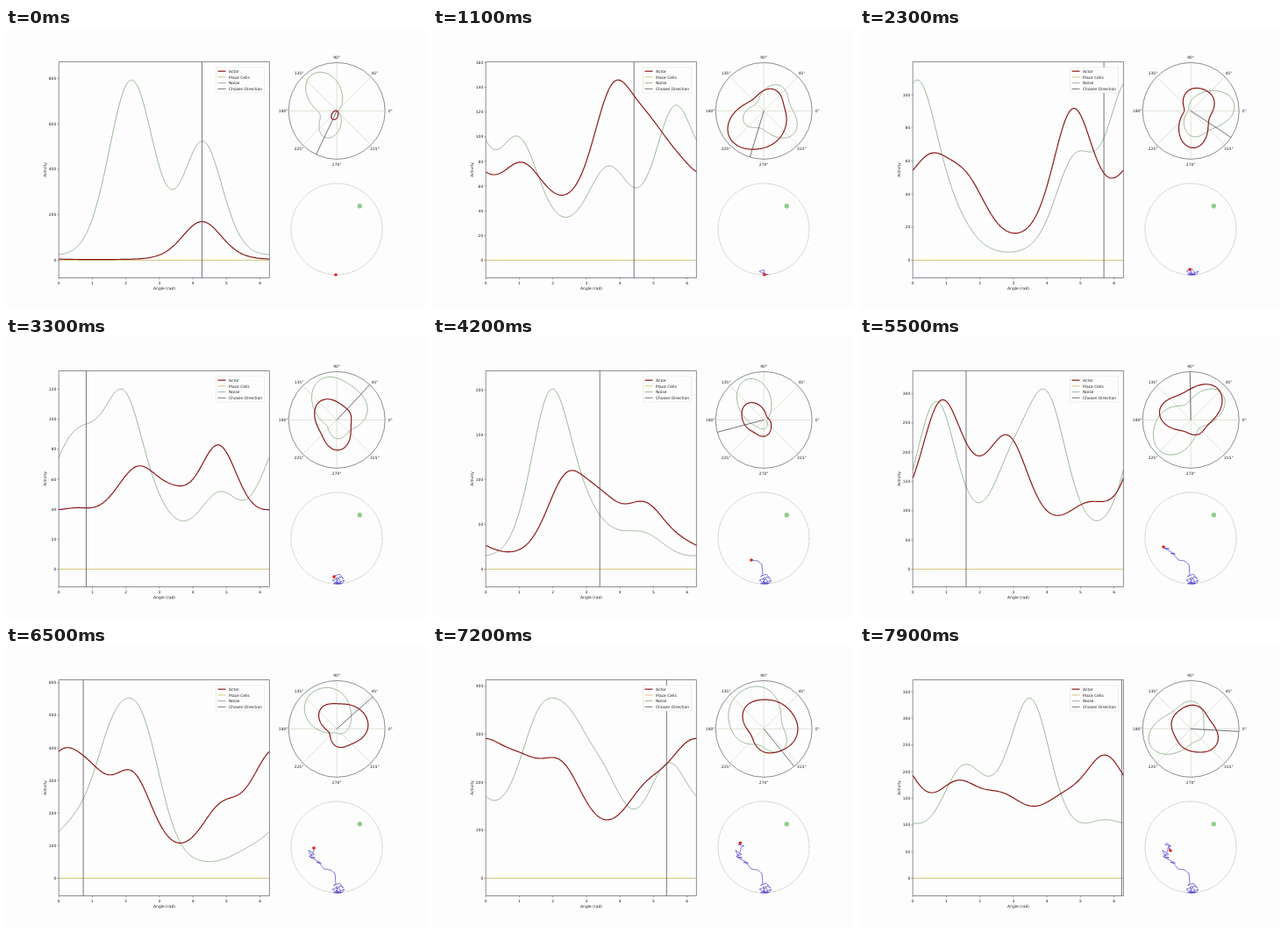
Recreate the animation shown at these times as an HTML page with a canvas. Size 480 by 320 pixels, loop 8000 ms.

```html
<!DOCTYPE html>
<html lang="en">
<head>
<meta charset="utf-8">
<title>Actor activity and path</title>
<style>
html, body { margin: 0; width: 100%; height: 100%; overflow: hidden; background: #fdfdfd; }
canvas { display: block; width: 480px; height: 320px; }
</style>
</head>
<body>
<canvas id="stage" width="480" height="320"></canvas>
<script>
const canvas = document.getElementById('stage');
const ctx = canvas.getContext('2d');
const ratio = Math.max(1, window.devicePixelRatio || 1);
canvas.width = 480 * ratio;
canvas.height = 320 * ratio;

const TAU = Math.PI * 2;
const STEP = 100, STEPS = 80, N = 240;
const BOX = { x: 60.2, y: 38.5, w: 240.2, h: 246 };
const ZERO = 264.4, PEAK = 205.2;
const POLAR = { x: 377.2, y: 94.4, r: 55 };
const ARENA = { x: 377, y: 229, r: 52 };
const PAPER = '#fdfdfd', INK = '#5c5c6c', ACTOR = '#8c1a18', CELLS = '#d2c06c',
      NOISE = '#82a67e', CHOSEN = '#525260', GRID = '#d6d6c8', TRAIL = '#5548cc';

// Activity over all directions: a base plus tuning bumps [direction, height].
function activity(base, ...bumps) {
  return Array.from({ length: N }, (_, i) => bumps.reduce(
    (sum, [dir, h]) => sum + h * Math.exp(3 * (Math.cos(i / N * TAU - dir) - 1)), base));
}

// A pose at one step; both curves are scaled so that the taller one peaks at max.
function pose(step, max, dir, actor, noise) {
  const k = max / Math.max(...actor, ...noise);
  return { step, dir, actor: actor.map(v => v * k), noise: noise.map(v => v * k) };
}

const poses = [
  pose(0, 793, 4.27,
    activity(0.7, [4.27, 43]),
    activity(2, [1.9, 111], [2.42, 111], [4.3, 130])),
  pose(11, 146, 4.42,
    activity(60, [1.08, 51], [3.8, 130], [4.85, 70], [5.8, 37]),
    activity(32, [0.98, 105], [3.66, 75], [5.65, 142])),
  pose(23, 109, 5.7,
    activity(22, [0.55, 78], [1.6, 63], [4.78, 152], [6.05, 23]),
    activity(6, [0.15, 188], [1.2, 32], [4.82, 104], [5.6, 15])),
  pose(42, 201, 3.4,
    activity(14, [2.4, 85], [3.45, 52], [4.75, 55], [5.9, 12]),
    activity(11, [1.94, 185], [2.9, 36], [3.8, 14], [4.75, 26])),
  pose(55, 308, 1.59,
    activity(45, [0.84, 135], [1.8, 26], [2.85, 97], [5.25, 27]),
    activity(35, [0.7, 152], [2.95, 72], [4, 148])),
  pose(65, 553, 0.73,
    activity(25, [0.05, 82], [0.95, 65], [2.2, 84], [4.85, 50], [5.85, 14]),
    activity(14, [0.45, 32], [1.6, 118], [2.5, 130], [5.7, 13])),
  pose(79, 338, 6.23,
    activity(68, [1.35, 42], [2.65, 27], [4.5, 23], [5.75, 72]),
    activity(45, [1.5, 80], [2.55, 22], [3.52, 158], [5.75, 21]))
];

// Waypoints: step, x, y, and how far the agent strays before the next one.
const way = [
  [0, 376, 281, 6, 6], [11, 378, 281, 9, 5], [23, 376, 275, 9, 6], [34, 376, 271, 0, 0],
  [36, 375, 259, 0, 0], [39, 370, 255, 0, 0], [42, 363, 254, 0, 0], [45, 357, 247, 7, 4],
  [55, 346, 239, 5, 8], [65, 351, 230, 7, 9], [79, 354, 233, 0, 0]
];

const rand = n => {
  const v = Math.sin(n * 127.1 + 11.7) * 43758.5453;
  return (v - Math.floor(v)) * 2 - 1;
};
const lerp = (a, b, u) => a + (b - a) * u;

// Value noise with a corner every second step.
function wander(step, seed) {
  const i = Math.floor(step / 2);
  return lerp(rand(i + seed), rand(i + 1 + seed), step / 2 - i);
}

function agent(step) {
  const i = Math.min(way.findLastIndex(w => w[0] <= step), way.length - 2);
  const [s, x, y, sx, sy] = way[i], next = way[i + 1];
  const u = (step - s) / (next[0] - s);
  const stray = u >= 1 ? 0 : Math.sqrt(Math.sin(Math.PI * u));
  const dx = lerp(x, next[1], u) + sx * stray * wander(step, 0) - ARENA.x;
  const dy = lerp(y, next[2], u) + sy * stray * wander(step, 300) - ARENA.y;
  const fit = Math.min(1, ARENA.r / Math.hypot(dx, dy));
  return [ARENA.x + dx * fit, ARENA.y + dy * fit];
}
const trail = Array.from({ length: STEPS }, (_, i) => agent(i));

function state(step) {
  const i = poses.findLastIndex(p => p.step <= step), a = poses[i];
  if (a.step === step) return a;
  const b = poses[i + 1], u = (step - a.step) / (b.step - a.step);
  const [p, q] = [trail[step], trail[step + 1]];
  const dir = (Math.atan2(p[1] - q[1], q[0] - p[0]) + TAU) % TAU;
  const actor = a.actor.map((v, j) => lerp(v, b.actor[j], u));
  const pull = activity(0, [dir, 0.5 * Math.sin(Math.PI * u) * Math.max(...actor)]);
  const noise = a.noise.map((v, j) => lerp(v, b.noise[j], u) + pull[j]);
  return { actor, noise, dir };
}

function stroke(points, color, width) {
  ctx.beginPath();
  points.forEach(([x, y]) => ctx.lineTo(x, y));
  ctx.strokeStyle = color;
  ctx.lineWidth = width;
  ctx.stroke();
}

function frame(x, y, w, h, color, width) {
  ctx.strokeStyle = color;
  ctx.lineWidth = width;
  ctx.strokeRect(x, y, w, h);
}

function ring({ x, y, r }, color, width, dash = []) {
  ctx.beginPath();
  ctx.arc(x, y, r, 0, TAU);
  ctx.strokeStyle = color;
  ctx.lineWidth = width;
  ctx.setLineDash(dash);
  ctx.stroke();
  ctx.setLineDash([]);
}

function disc(x, y, r, color) {
  ctx.beginPath();
  ctx.arc(x, y, r, 0, TAU);
  ctx.fillStyle = color;
  ctx.fill();
}

function label(text, x, y, align = 'center') {
  ctx.font = '4.45px "DejaVu Sans", sans-serif';
  ctx.fillStyle = '#202024';
  ctx.textAlign = align;
  ctx.fillText(text, x, y + 1.6);
}

function tickStep(range) {
  const raw = range / 9, base = 10 ** Math.floor(Math.log10(raw));
  return base * [1, 2, 2.5, 5, 10].find(m => m * base >= raw);
}

function drawChart(s, max) {
  const { x, y, w, h } = BOX, scale = PEAK / max;
  const line = v => v.concat(v[0]).map((q, j) => [x + j * w / N, ZERO - q * scale]);
  stroke([[x, ZERO], [x + w, ZERO]], CELLS, 0.9);
  stroke(line(s.noise), NOISE, 0.8);
  stroke(line(s.actor), ACTOR, 1.2);
  const dx = x + s.dir / TAU * w;
  stroke([[dx, y], [dx, y + h]], CHOSEN, 0.8);
  frame(x, y, w, h, INK, 0.7);

  for (let i = 0; i <= 6; i++) {
    const tx = x + i / TAU * w;
    stroke([[tx, y + h], [tx, y + h + 1.8]], INK, 0.6);
    label(i, tx, 290);
  }
  const gap = tickStep(1.2 * max);
  for (let v = 0; v <= 1.1 * max; v += gap) {
    const ty = ZERO - v * scale;
    stroke([[x - 1.8, ty], [x, ty]], INK, 0.6);
    label(v, x - 3, ty, 'right');
  }
  label('Angle (rad)', 180.5, 296.2);
  ctx.save();
  ctx.translate(44, 161.5);
  ctx.rotate(-Math.PI / 2);
  label('Activity', 0, 0);
  ctx.restore();
}

function drawLegend() {
  ctx.fillStyle = PAPER;
  ctx.fillRect(239.5, 45, 55, 29);
  frame(239.5, 45, 55, 29, '#dcdcd4', 0.5);
  [['Actor', ACTOR, 1.2], ['Place Cells', CELLS, 0.9],
   ['Noise', NOISE, 0.8], ['Chosen Direction', CHOSEN, 0.8]].forEach(([name, color, width], i) => {
    const y = 49.2 + i * 6.7;
    stroke([[241.5, y], [250.5, y]], color, width);
    label(name, 254, y, 'left');
  });
}

function drawPolar(s, max) {
  const { x, y, r } = POLAR;
  const at = (angle, d) => [x + d * Math.cos(angle), y - d * Math.sin(angle)];
  for (let i = 0; i < 8; i++) {
    const angle = i * TAU / 8;
    stroke([[x, y], at(angle, r)], GRID, 0.7);
    label(i * 45 + '°', ...at(angle, 61));
  }
  const loop = v => v.concat(v[0]).map((q, j) => at(j / N * TAU, q / max * r / 1.1));
  stroke(loop(s.noise), NOISE, 0.8);
  stroke(loop(s.actor), ACTOR, 1.2);
  stroke([[x, y], at(s.dir, r)], CHOSEN, 0.8);
  ring(POLAR, INK, 0.7);
}

function drawArena(step) {
  ring(ARENA, '#b6b6ac', 0.9, [1.5, 1]);
  disc(403.3, 202.8, 2.7, '#90cc90');
  stroke(trail.slice(0, step + 1), TRAIL, 0.75);
  disc(...trail[step], 1.8, '#dc2418');
}

function draw(step) {
  const s = state(step), max = Math.max(...s.actor, ...s.noise);
  ctx.setTransform(ratio, 0, 0, ratio, 0, 0);
  ctx.fillStyle = PAPER;
  ctx.fillRect(0, 0, 480, 320);
  ctx.lineJoin = 'round';
  drawChart(s, max);
  drawLegend();
  drawPolar(s, max);
  drawArena(step);
}

let shown = -1;
function tick() {
  const step = Math.floor(performance.now() / STEP) % STEPS;
  if (step !== shown) draw(shown = step);
  requestAnimationFrame(tick);
}
tick();
</script>
</body>
</html>
```
